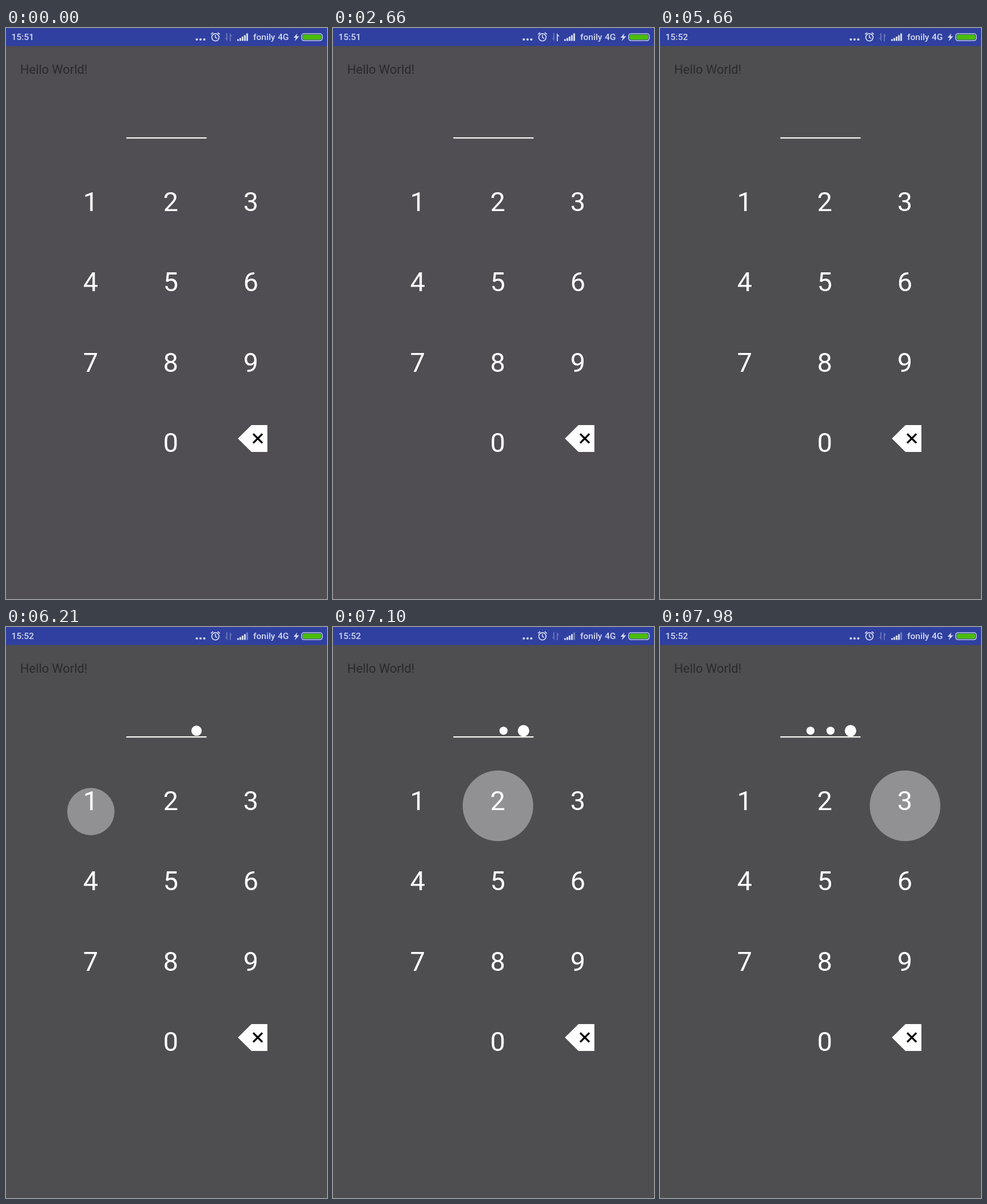
Animation, 561 px wide and 998 px high, one loop 8000 ms. Source, as an HTML page:

```html
<!DOCTYPE html>
<html lang="en">
<head>
<meta charset="utf-8">
<title>PIN pad</title>
<style>
html, body { margin: 0; width: 100%; height: 100%; overflow: hidden; background: #4e4e50; }
svg { display: block; width: 561px; height: 998px; font-family: Roboto, "Open Sans", sans-serif; }
.status { font-size: 15.5px; font-weight: 500; fill: #d3d9f1; }
.keys { font-size: 46.75px; fill: #fff; text-anchor: middle; }
</style>
</head>
<body>
<svg viewBox="0 0 561 998">
  <rect id="back" width="561" height="998" fill="#504d53"/>
  <rect width="561" height="31.5" fill="#3040a0"/>

  <g class="status">
    <text id="clock" x="9.5" y="21.3">15:51</text>
    <text x="432" y="21.3">fonily</text>
    <text x="475" y="21.3">4G</text>
  </g>

  <g fill="#d3d9f1">
    <circle cx="333.5" cy="20" r="2.1"/>
    <circle cx="340" cy="20" r="2.1"/>
    <circle cx="346.5" cy="20" r="2.1"/>
    <path d="M509 9.5L502.5 17H506.5L504.5 23L512.5 14.5H508Z"/>
    <g id="bars"></g>
  </g>
  <g fill="none" stroke="#d3d9f1" stroke-width="1.7">
    <circle cx="366" cy="16.3" r="6.4"/>
    <path d="M366 12.3V16.6L369 18.3M358.3 11.2L362 8M373.7 11.2L370 8"/>
  </g>
  <path id="down" d="M387 9V23L382.5 17.5H385V9Z" fill="#d3d9f1"/>
  <path id="up" d="M391 23V9L395.8 14.5H393V23Z" fill="#d3d9f1"/>
  <rect x="516.7" y="9.9" width="36" height="12.2" rx="4" fill="#3040a0" stroke="#d3d9f1" stroke-width="1.4"/>
  <rect x="518.4" y="11.6" width="32.6" height="8.8" rx="2.6" fill="#4bbd0b"/>

  <text x="24.8" y="79.7" font-size="21.8" fill="#2a292c">Hello World!</text>
  <rect x="210.3" y="191" width="140.2" height="2.3" fill="#f3f2ee"/>

  <g id="ripples" fill="#fff" fill-opacity=".38"></g>
  <g id="dots" fill="#fff"></g>
  <g id="keys" class="keys"></g>

  <path d="M405.3 717.5L429 694H456.8V741H429Z" fill="#fff"/>
  <path d="M432 709.4L448 725.4M448 709.4L432 725.4" stroke="#000" stroke-width="3.4"/>
</svg>

<script>
const LOOP = 8000, SCALE_MS = 200, FULL = 84;
const COLUMNS = [148, 288, 428];
const presses = [
  { down: 5885, up: 6110 },
  { down: 6590, up: 7032 },
  { down: 7465, up: 7912 }
];
// start time, opacity of the down arrow, opacity of the up arrow
const traffic = [
  [0, .33, .33], [610, .9, .9], [1640, .33, .9],
  [2320, .33, .33], [2660, .33, .9], [3340, .33, .33]
];

const $ = id => document.getElementById(id);
function add(parent, tag, attrs, text = "") {
  const node = document.createElementNS("http://www.w3.org/2000/svg", tag);
  for (const name in attrs) node.setAttribute(name, attrs[name]);
  node.textContent = text;
  return $(parent).appendChild(node);
}

for (let n = 0; n < 10; n++) {
  const place = n ? n - 1 : 10;
  add("keys", "text", { x: COLUMNS[place % 3], y: 320 + Math.floor(place / 3) * 140.3 }, n);
}
const bars = [3, 5, 7.5, 10, 13].map((h, i) =>
  add("bars", "rect", { x: 404 + i * 4, y: 22.5 - h, width: 3, height: h }));
const ripples = COLUMNS.map(x => add("ripples", "circle", { cx: x + .3 }));
const dots = presses.map(() => add("dots", "circle", { cy: 181.3 }));

const clamp = v => Math.max(0, Math.min(1, v));
const ease = v => (1 - Math.cos(Math.PI * clamp(v))) / 2;
const release = (p, t) => 1 - ease((t - p.up) / SCALE_MS);

function draw(t) {
  const late = t >= 5660;
  $("clock").textContent = late ? "15:52" : "15:51";
  $("back").setAttribute("fill", late ? "#4e4e50" : "#504d53");
  bars[4].setAttribute("opacity", t >= 5940 ? .4 : 1);

  const [, down, up] = traffic.filter(step => step[0] <= t).pop();
  $("down").setAttribute("opacity", down);
  $("up").setAttribute("opacity", up);

  const typed = presses.filter(p => t >= p.up).length;
  presses.forEach((p, i) => {
    const size = t < p.up ? ease((t - p.down) / SCALE_MS) : release(p, t);
    ripples[i].setAttribute("r", FULL * size);
    ripples[i].setAttribute("cy", 343.3 - 42 * size);
    dots[i].setAttribute("cx", 333 - (typed - 1 - i) * 35);
    dots[i].setAttribute("r", i < typed ? 7.1 + 4 * release(p, t) : 0);
  });
}

const start = performance.now();
function tick() {
  draw((performance.now() - start) % LOOP);
  requestAnimationFrame(tick);
}
tick();
</script>
</body>
</html>
```
